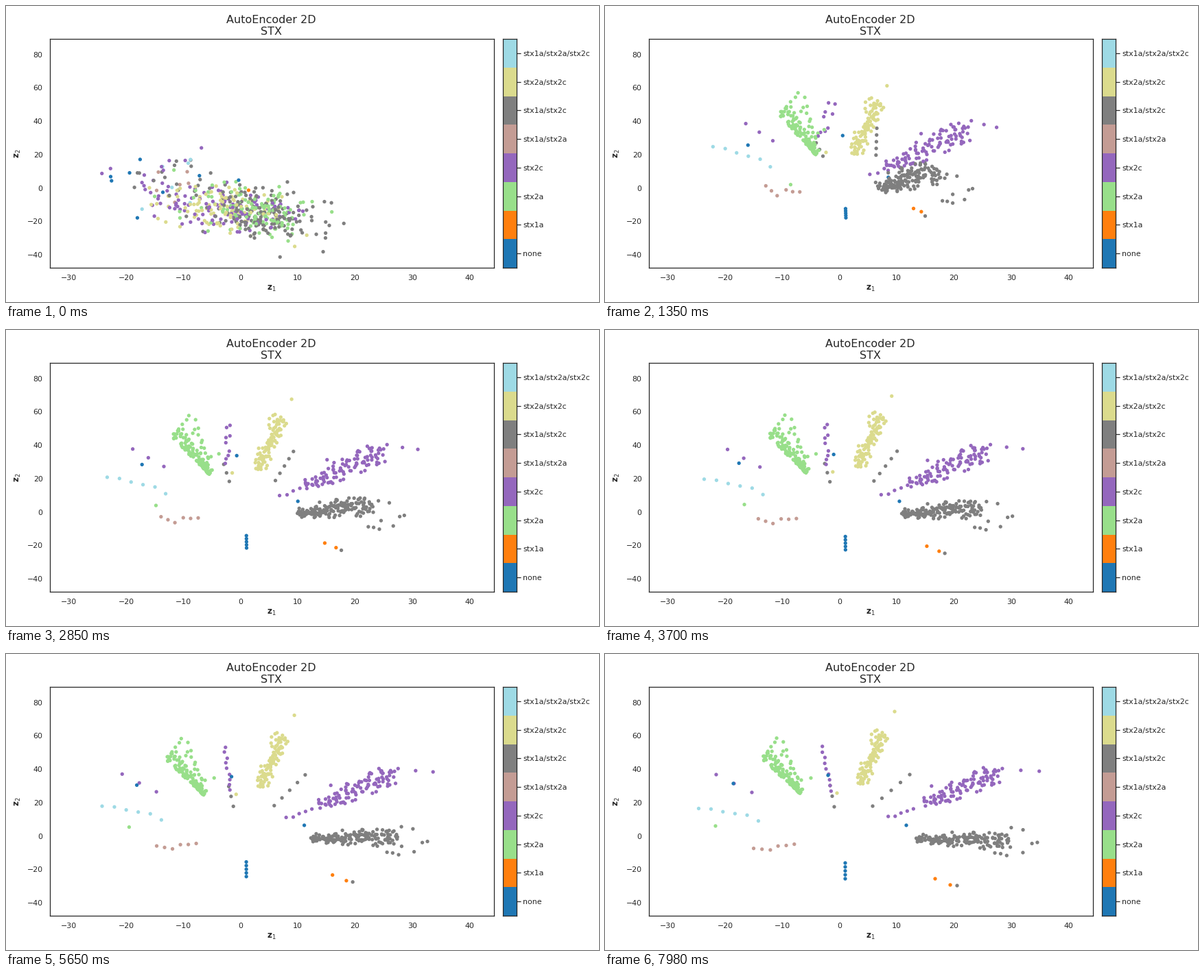
A matplotlib script that plays this animation: 864 px wide and 432 px high, repeating every 8 s.

```python
import numpy as np
import matplotlib.pyplot as plt
from matplotlib.animation import FuncAnimation

W, H, DPI = 864, 432, 72
FRAMES, STEP = 320, 25
INK = "#262626"
ZERO, UNIT = (341.8, 265.7), (8.335, -2.4375)  # pixels of the axes' origin and unit
FAN_OUT, END = 630, (FRAMES - 1) * STEP

NAMES = ["none", "stx1a", "stx2a", "stx2c", "stx1a/stx2a", "stx1a/stx2c",
         "stx2a/stx2c", "stx1a/stx2a/stx2c"]
COLORS = dict(zip(NAMES, plt.cm.tab20(np.linspace(0, 1, len(NAMES)))))

rng = np.random.default_rng(12)
groups, colors = [], []


def strew(line, along, off, width):
    """Places along a line, pushed sideways by a width that varies along it."""
    a, b = np.array(line, float).reshape(2, 2)
    d = b - a
    side = np.array([d[1], -d[0]]) / max(np.hypot(*d), 1)
    push = off * np.interp(along, (0, 1), width)
    return a + np.outer(along, d) + np.outer(push, side)


def arm(name, n, early, late, width=(0, 0), core=None, mess=1.3, noise=rng.normal):
    """Points that leave a common cloud for one line and drift to another.

    Groups with a core x start in the dense cloud, the rest in its left tail.
    """
    if core is None:
        start = rng.normal((240, 258), (48, 24), (n, 2))
        along = np.linspace(0, 1, n)
    else:
        start = rng.normal((core, 298), (42, 17), (n, 2))
        start[:, 1] += 0.1 * (start[:, 0] - 345)
        along = rng.random(n)
    off = np.clip(noise(size=n), -2.2, 3.2)
    groups.append([start,
                   strew(early, along, off, np.multiply(width, mess)),
                   strew(late, along, off, width)])
    colors.extend([COLORS[name]] * n)


# The four large clusters
arm("stx2a", 122, (276, 160, 331, 232), (225, 150, 284, 204), (14, 2), 365,
    noise=rng.exponential)
arm("stx2a/stx2c", 105, (354, 245, 391, 163), (372, 190, 405, 114), (4, 6), 318)
arm("stx1a/stx2c", 160, (344, 266, 368, 200), (452, 270, 588, 272), (2, 8), 378, mess=4)
arm("stx2c", 95, (352, 256, 484, 186), (465, 219, 575, 172), (4, 8), 330)

# Small groups and single points
arm("none", 5, (351, 286, 352, 289), (350, 305, 350, 328))
arm("none", 2, (231, 218, 369, 202), (187, 189, 325, 177))
arm("none", 1, (385, 250, 385, 250), (439, 250, 439, 250))
arm("stx1a", 2, (416, 261, 416, 261), (481, 328, 503, 337))
arm("stx2a", 3, (332, 195, 340, 180), (272, 187, 300, 181))
arm("stx2a", 1, (387, 271, 387, 271), (161, 251, 161, 251))
arm("stx2c", 9, (350, 145, 295, 185), (316, 135, 330, 200), (1, 1), mess=12)
arm("stx2c", 3, (251, 167, 277, 191), (162, 176, 214, 202))
arm("stx2c", 5, (358, 256, 403, 228), (413, 238, 449, 225), (1, 1))
arm("stx2c", 7, (445, 172, 505, 177), (475, 187, 632, 166), (8, 8))
arm("stx1a/stx2a", 6, (248, 252, 290, 270), (217, 287, 276, 279), (2, 2), mess=4)
arm("stx1a/stx2c", 5, (345, 181, 400, 213), (444, 176, 390, 222))
arm("stx1a/stx2c", 3, (286, 208, 300, 215), (328, 192, 334, 223))
arm("stx1a/stx2c", 9, (400, 265, 425, 245), (565, 278, 627, 263), (13, 13))
arm("stx1a/stx2c", 1, (417, 273, 417, 273), (513, 338, 513, 338))
arm("stx2a/stx2c", 2, (399, 151, 305, 225), (422, 84, 338, 203))
arm("stx1a/stx2a/stx2c", 6, (181, 181, 261, 222), (137, 223, 224, 241), (2, 2))

points = np.concatenate(groups, axis=1)
order = rng.permutation(points.shape[1])
cloud, early, late = (points[:, order] - ZERO) / UNIT

plt.rcParams.update({
    "font.family": "DejaVu Sans", "font.size": 11, "text.color": INK,
    "axes.edgecolor": INK, "axes.linewidth": 1.25,
    "xtick.color": INK, "ytick.color": INK,
})
fig = plt.figure(figsize=(W / DPI, H / DPI), dpi=DPI, facecolor="white")


def panel(x0, y0, x1, y1):
    return fig.add_axes([x0 / W, 1 - y1 / H, (x1 - x0) / W, (y1 - y0) / H])


def label(x, y, text, size, **kw):
    fig.text(x / W, 1 - y / H, text, fontsize=size, ha="center", **kw)


left, top, right, bottom = 63.6, 48, 711, 382
ax = panel(left, top, right, bottom)
ax.set_xlim((np.array([left, right]) - ZERO[0]) / UNIT[0])
ax.set_ylim((np.array([bottom, top]) - ZERO[1]) / UNIT[1])
ax.set_xticks(range(-30, 41, 10))
ax.set_yticks(range(-40, 81, 20))
ax.tick_params(length=0, pad=10)
label(386.5, 25, "AutoEncoder 2D", 16)
label(386.5, 42, "STX", 16)
label(387, 412.5, r"$\mathbf{z}_1$", 12, va="center")
label(17.5, 215.5, r"$\mathbf{z}_2$", 12, va="center", rotation=90)

bar = panel(724, top, 744, bottom)
bar.barh(range(len(NAMES)), 1, height=1, color=list(COLORS.values()))
bar.set_xlim(0, 1)
bar.set_ylim(-0.5, len(NAMES) - 0.5)
bar.set_xticks([])
bar.set_yticks(range(len(NAMES)), NAMES)
bar.yaxis.tick_right()
bar.tick_params(length=6, width=1.25, pad=3)

dots = ax.scatter(*cloud.T, s=28, c=np.array(colors)[order], linewidths=0, zorder=2)


def draw(i):
    t = i * STEP
    if t < FAN_OUT:
        a, b, f = cloud, early, t / FAN_OUT
    else:
        # Training slows down, so the drift follows a logarithm.
        u = (t - FAN_OUT) / (END - FAN_OUT)
        a, b, f = early, late, np.log1p(100 * u) / np.log(101)
    dots.set_offsets(a + (b - a) * f)
    return (dots,)


anim = FuncAnimation(fig, draw, frames=FRAMES, interval=STEP,
                     repeat=True, repeat_delay=0, blit=True)
plt.show()
```
